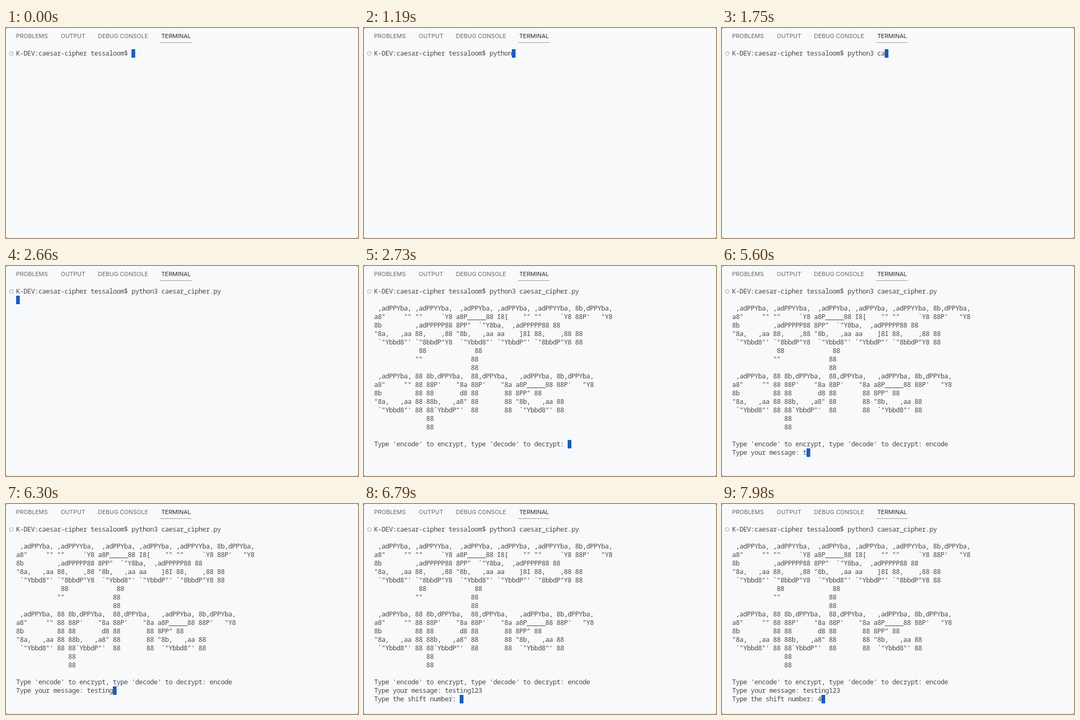
These frames come from a looping animation (662x396 px, 8000 ms). An HTML page:

```html
<!DOCTYPE html>
<html lang="en">
<head>
<meta charset="utf-8">
<title>Terminal session</title>
<style>
  html, body { margin: 0; width: 100%; height: 100%; overflow: hidden; background: #5a5c5e; }
  .panel {
    position: relative; width: 662px; height: 396px; overflow: hidden;
    box-sizing: border-box; border-bottom: 1px solid #e4e6e8;
    border-radius: 3px; background: #f7f9fb;
  }
  .tab {
    position: absolute; top: 7px; left: var(--x);
    font: 11px/16px Inter, sans-serif; color: #646668; white-space: nowrap;
  }
  .active { color: #2b2c2e; }
  .underline { position: absolute; left: 290px; top: 27px; width: 59px; height: 1px; background: #98999b; }
  .dot {
    position: absolute; left: 6px; top: 44px; width: 8px; height: 8px;
    box-sizing: border-box; border: 1px solid #a0a2a4; border-radius: 50%;
  }
  #screen {
    position: absolute; left: 19px; top: 40px; margin: 0; color: #47494b;
    font: 500 12.5px/16px "Noto Sans Mono", monospace;
    letter-spacing: calc(7px - 0.6em); font-variant-ligatures: none;
  }
  #cursor { position: absolute; left: 19px; top: 40px; width: 7px; height: 16px; background: #1c5cbe; }
</style>
</head>
<body>
<div class="panel">
  <span class="tab" style="--x:19px">PROBLEMS</span>
  <span class="tab" style="--x:103px">OUTPUT</span>
  <span class="tab" style="--x:173px">DEBUG CONSOLE</span>
  <span class="tab active" style="--x:292px">TERMINAL</span>
  <div class="underline"></div>
  <div class="dot"></div>
  <div id="cursor"></div>
  <pre id="screen"></pre>
</div>

<script type="text/plain" id="banner">
 ,adPPYba, ,adPPYYba,  ,adPPYba, ,adPPYba, ,adPPYYba, 8b,dPPYba,
a8"     "" ""     `Y8 a8P_____88 I8[    "" ""     `Y8 88P'   "Y8
8b         ,adPPPPP88 8PP"  `"Y8ba,  ,adPPPPP88 88
"8a,   ,aa 88,    ,88 "8b,   ,aa aa    ]8I 88,    ,88 88
 `"Ybbd8"' `"8bbdP"Y8  `"Ybbd8"' `"YbbdP"' `"8bbdP"Y8 88
            88             88
           ""             88
                          88
 ,adPPYba, 88 8b,dPPYba,  88,dPPYba,   ,adPPYba, 8b,dPPYba,
a8"     "" 88 88P'    "8a 88P'    "8a a8P_____88 88P'   "Y8
8b         88 88       d8 88       88 8PP" 88
"8a,   ,aa 88 88b,   ,a8" 88       88 "8b,   ,aa 88
 `"Ybbd8"' 88 88`YbbdP"'  88       88  `"Ybbd8"' 88
              88
              88
</script>

<script>
  const LOOP = 8000, CHAR = 7, LINE = 16;
  const screenEl = document.getElementById('screen');
  const cursor = document.getElementById('cursor');
  const banner = document.getElementById('banner').textContent;

  // Each entry: time in ms, text added to the terminal at that time.
  const steps = [
    [0, 'K-DEV:caesar-cipher tessaloom$ '],
    [700, 'p'], [770, 'y'], [910, 't'], [1050, 'h'], [1120, 'o'], [1190, 'n'],
    [1400, '3'], [1540, ' '], [1680, 'c'], [1750, 'a'], [1960, 'e'],
    [2240, 'sar_cipher.py '], [2660, '\n'],
    [2730, banner + "\nType 'encode' to encrypt, type 'decode' to decrypt: "],
    [4200, 'en'], [4410, 'c'], [4480, 'o'], [4550, 'd'], [4760, 'e'], [4830, '\n'],
    [4900, 'Type your message: '],
    [5600, 't'], [5670, 'e'], [5740, 's'], [5950, 't'], [6090, 'i'], [6230, 'n'], [6300, 'g'],
    [6510, '1'], [6580, '2'], [6650, '3'],
    [6790, '\nType the shift number: '], [7980, '4']
  ];

  let shown = null;

  function render(time) {
    const text = steps.filter(([at]) => at <= time).map(step => step[1]).join('');
    if (text === shown) return;
    shown = text;
    screenEl.textContent = text;
    const lines = text.split('\n');
    const x = lines[lines.length - 1].length * CHAR;
    const y = (lines.length - 1) * LINE;
    cursor.style.transform = `translate(${x}px, ${y}px)`;
  }

  const start = performance.now();
  function tick() {
    render((performance.now() - start) % LOOP);
    requestAnimationFrame(tick);
  }
  tick();
</script>
</body>
</html>
```
